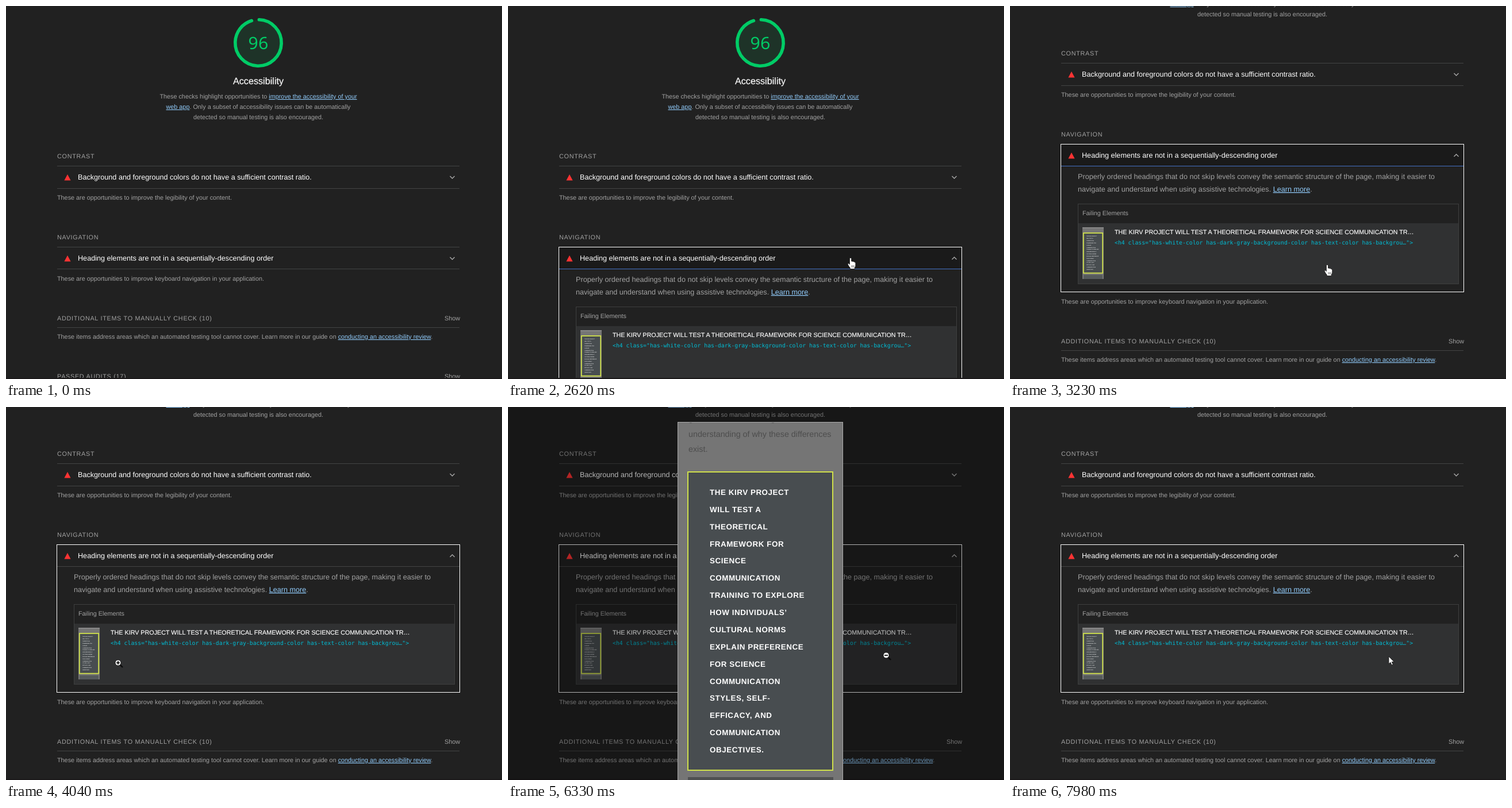
Recreate the animation shown at these times as an HTML page. Size 863 by 649 pixels, loop 8000 ms.

```html
<!DOCTYPE html>
<html lang="en">
<head>
<meta charset="utf-8">
<title>Accessibility audit</title>
<style>
  html, body { margin: 0; width: 100%; height: 100%; overflow: hidden; background: #212121; }
  svg { display: block; width: 863px; height: 649px; }
  text { font: 10.82px "Liberation Sans", Arial, sans-serif; fill: #a2a2a2; text-rendering: geometricPrecision; }
  .title { font-size: 12.63px; fill: #fff; }
  .body { font-size: 12.63px; }
  .head { letter-spacing: .72px; }
  .name { font-size: 16.2px; fill: #f5f5f5; stroke: #f5f5f5; stroke-width: .25px; }
  .node { font-size: 10.75px; fill: #fff; stroke: #fff; stroke-width: .15px; }
  .mid { text-anchor: middle; }
  .end { text-anchor: end; }
  .link { fill: #90caf9; text-decoration: underline; }
  .code { font: 9.8px "DejaVu Sans Mono", monospace; fill: #00bcd4; }
  .score { font: 29.5px "Noto Sans Mono", monospace; fill: #00cc66; text-anchor: middle; }
  .prose { font-size: 14.3px; fill: #4d4d4d; }
  .words text { font-size: 13.4px; font-weight: 700; letter-spacing: .55px; fill: #fff; }
</style>
</head>
<body>
<svg id="stage" viewBox="0 0 863 649"></svg>
<script>
const LOOP = 8000;
const ENTER = 780, HOVER = 1230, EXPAND = 2290, SCROLL = 3090, LEAVE = 3310;
const THUMB = 4000, ZOOM = 4300, CLOSE = 7570, LAG = 70;
const PANEL = 219;

const text = (x, y, s, cls = '') => `<text x="${x}" y="${y}" class="${cls}">${s}</text>`;
const rect = (x, y, w, h, fill, more = '') =>
  `<rect x="${x}" y="${y}" width="${w}" height="${h}" fill="${fill}" ${more}/>`;
const rule = y => rect(89, y, 700, 1, '#434444');
const link = s => `<tspan class="link">${s}</tspan>`;
const warn = y => `<path d="M107 ${y}l5.6 10.4h-11.2z" fill="#ff3333"/>`;
const chevronPath = (y, bend) => `M772.5 ${y - bend}l4 ${2 * bend}l4 ${-2 * bend}`;
const chevron = (y, id) =>
  `<path id="${id}" d="${chevronPath(y, 2)}" fill="none" stroke="#a8a8a8" stroke-width="1.4"/>`;
const audit = (y, s, id) => rule(y) + warn(y + 15) + text(125, y + 24, s, 'title') + chevron(y + 20, id);

const words = `THE KIRV PROJECT|WILL TEST A|THEORETICAL|FRAMEWORK FOR|SCIENCE|COMMUNICATION|TRAINING TO EXPLORE
|HOW INDIVIDUALS’|CULTURAL NORMS|EXPLAIN PREFERENCE|FOR SCIENCE|COMMUNICATION|STYLES, SELF-|EFFICACY, AND
|COMMUNICATION|OBJECTIVES.`.split('|').map((s, i) => text(56, 127 + i * 29.87, s.trim())).join('');

const gauge = `
  <circle cx="439" cy="64" r="40" fill="#00cc66" fill-opacity=".1"/>
  <circle cx="439" cy="64" r="40.2" fill="none" stroke="#00cc66" stroke-width="5.6" stroke-linecap="round"
    stroke-dasharray="239 300" transform="rotate(-88 439 64)"/>` + text(439, 74.5, '96', 'score');

const intro =
  text(439, 136, 'Accessibility', 'name mid') +
  text(439, 161, 'These checks highlight opportunities to ' + link('improve the accessibility of your'), 'mid') +
  text(439, 179, link('web app') + '. Only a subset of accessibility issues can be automatically', 'mid') +
  text(439, 197, 'detected so manual testing is also encouraged.', 'mid');

const contrast =
  text(89, 265, 'CONTRAST', 'head') +
  audit(278, 'Background and foreground colors do not have a sufficient contrast ratio.', 'chevA') +
  rule(317) + text(89, 337, 'These are opportunities to improve the legibility of your content.');

const navigation =
  text(89, 406, 'NAVIGATION', 'head') +
  rect(89, 420, 700, 38, '#1a1a1a', 'id="hover"') +
  audit(419, 'Heading elements are not in a sequentially-descending order', 'chevB') + rule(457);

const thumb = `<g transform="translate(126 564) scale(.1285)">
  ${rect(0, 0, 288, 700, '#757575')}${rect(0, 0, 288, 14, '#8a8a8a')}
  ${rect(18, 645, 253, 55, '#555a5c')}
  ${rect(14, 78, 260, 542, '#484d50', 'stroke="#cfe04a" stroke-width="14"')}
  <g class="words">${words}</g></g>`;

const panel = `<g id="panel">
  ${rect(89, 457, 700, 1, '#4470c4', 'id="focus"')}
  ${rect(88.5, 419.5, 701, 257, 'none', 'stroke="#fff"')}
  ${text(118, 480, 'Properly ordered headings that do not skip levels convey the semantic structure of the page, making it easier to', 'body')}
  ${text(118, 502, 'navigate and understand when using assistive technologies. ' + link('Learn more') + '.', 'body')}
  ${rect(118, 557, 662, 105, '#303132')}
  ${rect(118.5, 523.5, 662, 139, 'none', 'stroke="#3e3f3f"')}
  ${text(126, 543, 'Failing Elements')}
  ${text(182, 576, 'THE KIRV PROJECT WILL TEST A THEORETICAL FRAMEWORK FOR SCIENCE COMMUNICATION TR…', 'node')}
  ${text(182, 594, '&lt;h4 class="has-white-color has-dark-gray-background-color has-text-color has-backgrou…"&gt;', 'code')}
  ${thumb}</g>`;

const rest = `<g id="rest">
  ${text(89, 478, 'These are opportunities to improve keyboard navigation in your application.')}
  ${text(89, 547, 'ADDITIONAL ITEMS TO MANUALLY CHECK (10)', 'head')}
  ${text(790, 547, 'Show', 'end')}${rule(559)}
  ${text(89, 579, 'These items address areas which an automated testing tool cannot cover. Learn more in our guide on '
    + link('conducting an accessibility review') + '.')}
  ${text(89, 648, 'PASSED AUDITS (17)', 'head')}${text(790, 648, 'Show', 'end')}</g>`;

const shot = `<g id="shot">
  ${rect(0, 0, 863, 649, '#000', 'opacity=".3"')}
  ${rect(295.5, 26.5, 287, 640, '#757575', 'stroke="#adadad"')}
  <clipPath id="inside">${rect(296, 27, 287, 622, '#fff')}</clipPath>
  <g clip-path="url(#inside)">${text(314, 25, 'g', 'prose')}${text(457, 25, 'g', 'prose')}</g>
  ${text(314, 52, 'understanding of why these differences', 'prose')}${text(314, 78, 'exist.', 'prose')}
  ${rect(313, 113, 252, 519, '#484d50', 'stroke="#cfe04a" stroke-width="2"')}
  <g class="words" transform="translate(295 26)">${words}</g>
  ${rect(313, 644, 253, 5, '#4f5051')}</g>`;

const lens = sign => `
  <path d="M3.4 3.4L8 8" stroke="#0a0a0a" stroke-width="2.4"/>
  <circle r="5" fill="#fff" stroke="#0a0a0a" stroke-width=".8"/>
  <path d="${sign}" stroke="#000" stroke-width="1.7"/>`;
const shapes = {
  arrow: '<path d="M0 0V13L3 10.3L5.1 15L7.3 14L5.3 9.5H9.3Z" fill="#fff" stroke="#111" stroke-width=".8"/>',
  hand: `<path d="M-1.6 1.2Q0 -1 1.6 1.2V6.2Q3.2 5.4 4.2 6.8Q5.8 6.1 6.6 7.6Q8.6 7.2 8.8 9.4
    V13.5Q8.6 16 7.2 17.3V19.5H-.8V17.6Q-2.6 15.8 -4.6 12Q-5.4 9.8 -3.4 9.8L-1.6 11.6Z"
    fill="#fff" stroke="#111" stroke-width=".8"/><path d="M2 13v4M4 13v4M6 13v4" stroke="#555" stroke-width=".8"/>`,
  zoomIn: lens('M-3 0H3M0 -3V3'),
  zoomOut: lens('M-3 0H3')
};
const pointer = '<g id="pointer">' +
  Object.entries(shapes).map(([k, s]) => `<g id="${k}">${s}</g>`).join('') + '</g>';

document.getElementById('stage').innerHTML =
  rect(0, 0, 863, 649, '#212121') +
  `<g id="page">${gauge}${intro}${contrast}${navigation}${panel}${rest}</g>` +
  rect(0, 647, 863, 2, '#1b191a') + shot + pointer;

const el = id => document.getElementById(id);
const show = (id, on) => el(id).setAttribute('display', on ? 'inline' : 'none');
const move = (id, x, y) => el(id).setAttribute('transform', `translate(${x} ${y})`);

const progress = (t, from, to) => Math.min(1, Math.max(0, (t - from) / (to - from)));
const smooth = p => p * p * (3 - 2 * p);
const easeOut = p => 1 - (1 - p) ** 4;
const within = (t, from, to) => t >= from && t < to;

// Each gesture is an eased arc that starts where the last one ended.
const gestures = [
  { from: 720, to: 1180, end: [50, 433], bend: [150, 560] },
  { from: 1180, to: 1580, end: [432, 447], bend: [250, 438] },
  { from: 1610, to: 2140, end: [598, 433], bend: [520, 462] },
  { from: EXPAND, to: 2620, end: [596, 438] },
  { from: 2620, to: 3230, end: [552, 450] },
  { from: 3230, to: ZOOM, end: [137, 447], bend: [330, 438] },
  { from: 4790, to: 5180, end: [345, 162], bend: [210, 200] },
  { from: 5180, to: 5610, end: [514, 618], bend: [430, 400] },
  { from: 5640, to: 5910, end: [662, 463] },
  { from: 6040, to: 6330, end: [658, 432] },
  { from: 7900, to: 7980, end: [659, 434] }
];

function pointerAt(t) {
  let pos = [455, 640];
  for (const { from, to, end, bend } of gestures) {
    if (t < from) break;
    const p = smooth(progress(t, from, to)), q = 1 - p;
    pos = pos.map((a, i) => {
      const mid = bend ? bend[i] : (a + end[i]) / 2;
      return q * q * a + 2 * q * p * mid + p * p * end[i];
    });
  }
  return pos.map(Math.round);
}

function pointerShape(t) {
  if (within(t, HOVER, LEAVE)) return 'hand';
  if (within(t, THUMB, ZOOM)) return 'zoomIn';
  return within(t, ZOOM, CLOSE + LAG) ? 'zoomOut' : 'arrow';
}

function draw(t) {
  const open = t >= EXPAND;
  move('page', 0, -Math.floor(180 * easeOut(progress(t, SCROLL, SCROLL + 180))));
  move('rest', 0, open ? PANEL : 0);
  show('panel', open);
  show('focus', t < LEAVE);
  show('hover', within(t, HOVER, LEAVE));
  show('shot', within(t, ZOOM, CLOSE));
  el('chevB').setAttribute('d', chevronPath(439, 2 - 4 * progress(t, EXPAND, EXPAND + 200)));

  const shape = pointerShape(t);
  for (const k in shapes) show(k, k === shape);
  show('pointer', t >= ENTER);
  move('pointer', ...pointerAt(t));
}

const start = performance.now();
function tick() {
  draw((performance.now() - start) % LOOP);
  requestAnimationFrame(tick);
}
tick();
</script>
</body>
</html>
```
